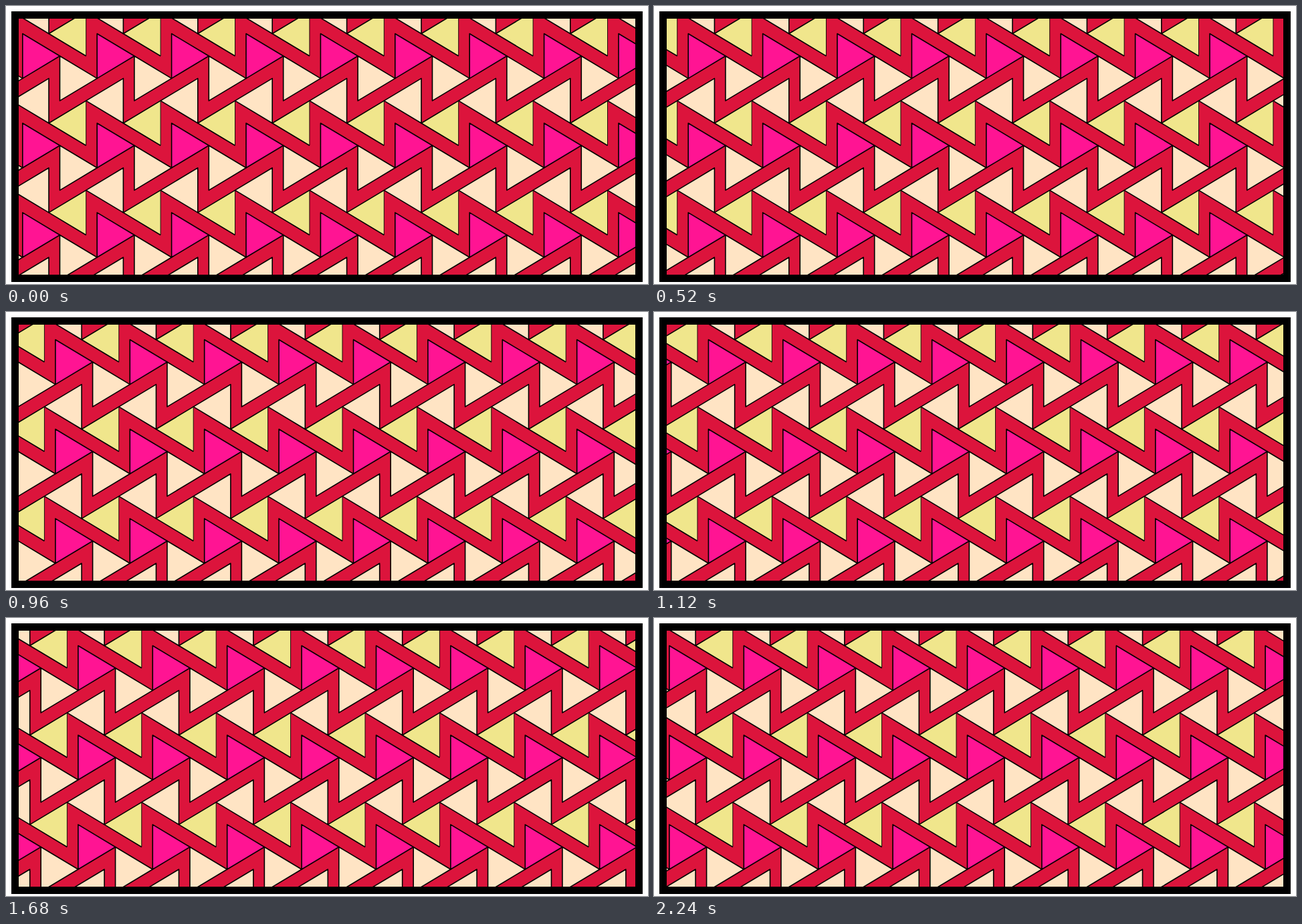
These frames come from a looping animation (960x417 px, 2.28 s). An HTML page:

```html
<!DOCTYPE html>
<html lang="en">
<head>
<meta charset="utf-8">
<title>Drifting triangles</title>
<style>
  html, body { margin: 0; width: 100%; height: 100%; overflow: hidden; background: #fff; }
  svg { display: block; }
</style>
</head>
<body>
<svg width="960" height="417" viewBox="0 0 960 417">
  <defs><clipPath id="window"><rect x="19" y="19" width="922" height="384"/></clipPath></defs>
  <rect x="8" y="8" width="944" height="406"/>
  <g clip-path="url(#window)">
    <rect x="19" y="19" width="922" height="384" fill="#dc143c"/>
    <g id="tiles" stroke="#000" stroke-width="1.6" stroke-linejoin="round"></g>
  </g>
</svg>
<script>
const TILE_W = 111.4, TILE_H = 134.2;
const HALF = TILE_W / 2, SIDE = TILE_H / 2, RISE = TILE_H / 4;
const LEFT = 24.8, TOP = 41.5, BAND = 16.5;
const FRAME_MS = 40, LOOP_MS = 2280, STEPS = 59;
const SKIPS = [4, 24]; // the drift advances one extra step here

const tiles = document.getElementById('tiles');

function addPath(shape, attributes) {
  let d = '';
  for (let row = -1; row < 4; row++) {
    for (let col = -3; col < 10; col++) {
      d += shape(LEFT + col * TILE_W, TOP + row * TILE_H);
    }
  }
  const path = document.createElementNS('http://www.w3.org/2000/svg', 'path');
  path.setAttribute('d', d);
  for (const name in attributes) path.setAttribute(name, attributes[name]);
  tiles.append(path);
}

// Vertical side starting at (dx, dy); the tip points right (1) or left (-1).
const triangle = (dx, dy, dir, end = 'Z') => (x, y) =>
  `M${x + dx} ${y + dy}l${dir * HALF} ${RISE}l${-dir * HALF} ${RISE}${end}`;

addPath(triangle(0, 0, 1), { fill: '#ff1493' });
addPath(triangle(HALF, RISE, 1), { fill: '#ffe4c4' });
addPath(triangle(HALF - BAND, SIDE, -1), { fill: '#ffe4c4' });
addPath(triangle(-BAND, -RISE, -1, ''), { fill: '#f0e68c' });
addPath((x, y) => `M${x - BAND} ${y - RISE}v${SIDE}`, { 'stroke-width': 0.9 });

function draw(time) {
  const frame = Math.floor((time % LOOP_MS) / FRAME_MS);
  const step = frame + SKIPS.filter(at => frame >= at).length;
  tiles.setAttribute('transform', `translate(${step * TILE_W / STEPS} 0)`);
}

const start = performance.now();
function tick() {
  draw(performance.now() - start);
  requestAnimationFrame(tick);
}
tick();
</script>
</body>
</html>
```
